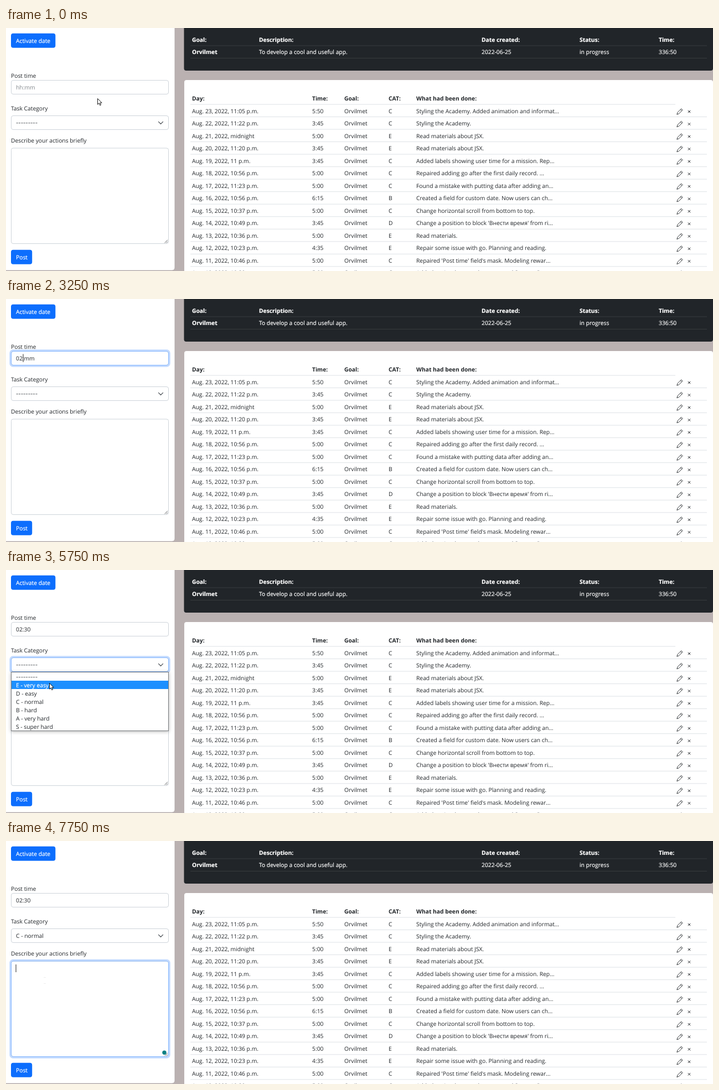
These frames come from a looping animation (1277x439 px, 8 s). An HTML page:

```html
<!DOCTYPE html>
<html lang="en">
<head>
<meta charset="utf-8">
<title>Time log</title>
<style>
  html, body { margin: 0; width: 100%; height: 100%; overflow: hidden; background: #bab1b1; }
  svg { display: block; width: 1277px; height: 439px; }
  text { font: 10.3px "Open Sans", "Noto Sans", sans-serif; fill: #212529; white-space: pre; text-rendering: geometricPrecision; }
  .bold { font-weight: 700; }
  .light { fill: #fff; stroke: #fff; stroke-width: .2; }
  .hint { fill: #82878c; }
  .dashes { font: 12px "DejaVu Sans", sans-serif; fill: #50555a; }
  .button { fill: #0d6efd; }
  .field { fill: #fff; stroke: #ced4da; }
  .rule { stroke: #dee2e6; }
  .dark-rule { stroke: #373b3e; }
  .focus { fill: none; stroke: #86b7fe; }
  .glow { fill: none; stroke: #0d6efd; stroke-opacity: .25; stroke-width: 2.7; }
  .icon { fill: none; stroke: #212529; }
  .caret { fill: #222; }
  .list { fill: #fff; stroke: #76797c; filter: drop-shadow(0 1px 3px rgba(0, 0, 0, .3)); }
  .pick { fill: #1e90ff; }
  [data-on] { visibility: hidden; }
</style>
</head>
<body>
<svg viewBox="0 0 1277 439">
  <defs>
    <path id="arrow" d="M.5 .5v10.6l2.5-2.3 1.8 4 1.7-.8-1.7-3.8h3.3z" fill="#fff" stroke="#000" stroke-width=".9"/>
    <path id="beam" d="M-2-5.5h4M-2 5.5h4" stroke="#000" stroke-opacity=".07"/>
    <g id="tools" class="icon">
      <path d="M1211.8 156.2l1.3-3.8 6.6-6.6 2.4 2.4-6.6 6.6zM1218.2 147.3l2.4 2.4" stroke-width=".9" stroke-linejoin="round"/>
      <path d="M1231.8 148.8l4.4 4.4m0-4.4l-4.4 4.4"/>
    </g>
  </defs>

  <path d="M-2-2H305V433a5 5 0 0 1-5 5H-2z" fill="#fff" stroke="#a9a1a1" stroke-width=".8"/>
  <rect x="321.5" y="-6" width="955.5" height="83" rx="4" fill="#212529"/>
  <rect x="322" y="94" width="955" height="360" rx="4" fill="#fff"/>
  <g id="tables"></g>

  <rect class="button" x="9" y="9.7" width="80.3" height="26" rx="4"/>
  <text class="light" x="18" y="26.6">Activate date</text>
  <text x="9" y="90">Post time</text>
  <text x="9" y="149">Task Category</text>
  <text x="9" y="207.3">Describe your actions briefly</text>
  <rect class="button" x="9" y="400.8" width="38.2" height="26" rx="4"/>
  <text class="light" x="18" y="417.7">Post</text>

  <rect class="field" x="9.5" y="94.5" width="284" height="25" rx="3.5"/>
  <rect class="field" x="9.5" y="158.5" width="284" height="25" rx="3.5"/>
  <rect class="field" x="9.5" y="217" width="284" height="172.5" rx="3.5"/>
  <path d="M275.5 169.3l4 4 4-4" fill="none" stroke="#41474d" stroke-width="1.2" stroke-linecap="round"/>
  <path d="M286.5 388.3l5.5-5.5m-2.5 5.5l2.5-2.5" class="icon" stroke-width=".7"/>
  <g id="rings"></g>

  <text class="hint" x="18" y="111" data-on="0-750">hh:mm</text>
  <text x="18" y="111" data-on="750-3000">hh:mm</text>
  <text x="18" y="111" data-on="3000-3250">0h:mm</text>
  <text x="18" y="111" data-on="3250-4000">02:mm</text>
  <text x="18" y="111" data-on="4000-4250">02:3m</text>
  <text x="18" y="111" data-on="4250-8000">02:30</text>
  <text class="dashes" x="18" y="174.8" data-on="0-7250">---------</text>
  <text x="18" y="175" data-on="7250-8000">C - normal</text>

  <g class="caret">
    <rect x="51" y="99.5" width="1" height="14.5" data-on="750-1250 1750-2250 2750-3000"/>
    <rect x="24" y="99.5" width="1" height="14.5" data-on="3000-3250"/>
    <rect x="30.5" y="99.5" width="1" height="14.5" data-on="3250-3750"/>
    <rect x="39" y="99.5" width="1" height="14.5" data-on="4000-4250"/>
    <rect x="44.5" y="99.5" width="1" height="14.5" data-on="4250-4750"/>
    <rect x="17.5" y="223" width="1" height="14" data-on="7750-8000"/>
  </g>
  <circle cx="286" cy="382.3" r="3.7" fill="#0b8083" data-on="7750-8000"/>

  <g id="menu" data-on="5250-7000"></g>
  <g id="pointer"></g>
</svg>
<script>
  const LOOP = 8000;
  const GOAL = 'Orvilmet';
  const byId = id => document.getElementById(id);
  const label = (x, y, str, cls = '') => `<text class="${cls}" x="${x}" y="${y}">${str}</text>`;
  const line = (y, end, cls = 'rule') => `<path class="${cls}" d="M333 ${y}H${end}"/>`;
  const cells = (xs, y, strs, cls) => strs.map((s, i) => label(xs[i], y, s, cls)).join('');

  // Goal summary and log table
  const goalX = [336, 457, 859, 1036, 1179];
  const logX = [336, 553, 611, 691, 741];
  const log = [
    ['23, 2022, 11:05 p.m.', '5:50', 'C', 'Styling the Academy. Added animation and informat...'],
    ['22, 2022, 11:22 p.m.', '3:45', 'C', 'Styling the Academy.'],
    ['21, 2022, midnight', '5:00', 'E', 'Read materials about JSX.'],
    ['20, 2022, 11:20 p.m.', '3:45', 'E', 'Read materials about JSX.'],
    ['19, 2022, 11 p.m.', '3:45', 'C', 'Added labels showing user time for a mission. Rep...'],
    ['18, 2022, 10:56 p.m.', '5:00', 'C', 'Repaired adding go after the first daily record. ...'],
    ['17, 2022, 11:23 p.m.', '5:00', 'C', 'Found a mistake with putting data after adding an...'],
    ['16, 2022, 10:56 p.m.', '6:15', 'B', 'Created a field for custom date. Now users can ch...'],
    ['15, 2022, 10:37 p.m.', '5:00', 'C', 'Change horizontal scroll from bottom to top.'],
    ['14, 2022, 10:49 p.m.', '3:45', 'D', "Change a position to block 'Внести время' from ri..."],
    ['13, 2022, 10:36 p.m.', '5:00', 'E', 'Read materials.'],
    ['12, 2022, 10:23 p.m.', '4:35', 'E', 'Repair some issue with go. Planning and reading.'],
    ['11, 2022, 10:46 p.m.', '5:00', 'C', "Repaired 'Post time' field's mask. Modeling rewar..."],
    ['10, 2022, 10:30 p.m.', '5:00', 'C', 'Added an Academy to the menu and System. R...']
  ];
  byId('tables').innerHTML =
    cells(goalX, 24.5, ['Goal:', 'Description:', 'Date created:', 'Status:', 'Time:'], 'bold light') +
    label(336, 47, GOAL, 'bold light') +
    cells(goalX.slice(1), 47, ['To develop a cool and useful app.', '2022-06-25', 'in progress', '336:50'], 'light') +
    line(32, 1266, 'dark-rule') + line(54.5, 1266, 'dark-rule') +
    cells(logX, 131, ['Day:', 'Time:', 'Goal:', 'CAT:', 'What had been done:'], 'bold') +
    line(138, 1209) +
    log.map(([day, time, cat, done], i) => {
      const dy = 22.53 * i;
      return cells(logX, 153.5 + dy, ['Aug. ' + day, time, GOAL, cat, done]) +
        line(160.5 + dy, 1266) + `<use href="#tools" y="${dy}"/>`;
    }).join('');

  // Focus rings, at half strength while they fade
  const ring = (y, h, full, half) => [[full, 1], [half, .5]].map(([on, alpha]) =>
    `<g data-on="${on}" opacity="${alpha}">
      <rect class="glow" x="7.65" y="${y - 1.85}" width="287.7" height="${h + 3.7}" rx="5"/>
      <rect class="focus" x="9.5" y="${y}" width="284" height="${h}" rx="3.5"/></g>`).join('');
  byId('rings').innerHTML =
    ring(94.5, 25, '750-5250', '5250-5500') +
    ring(158.5, 25, '5500-7500', '5250-5500 7500-7750') +
    ring(217, 172.5, '7750-8000', '7500-7750');

  // Open category list
  const options = ['---------', 'E - very easy', 'D - easy', 'C - normal', 'B - hard', 'A - very hard', 'S - super hard'];
  const picked = ['5250-5750', '5750-6000', '6000-6250', '6250-7000'];
  const option = (str, i, cls) => label(18, 196.5 + 15 * i, str, (i ? '' : 'dashes ') + cls);
  byId('menu').innerHTML =
    '<rect class="list" x="9.5" y="184.5" width="284" height="106"/>' +
    options.map((s, i) => option(s, i, '')).join('') +
    picked.map((on, i) => `<g data-on="${on}">
      <rect class="pick" x="10" y="${185 + 15 * i}" width="283" height="15"/>${option(options[i], i, 'light')}</g>`).join('');

  // Pointer stops: shape, x, y, time shown
  const stops = [
    ['arrow', 165, 127, '0-250'], ['arrow', 149, 117, '250-750'],
    ['beam', 62, 111, '750-1000'], ['beam', 48, 111, '1000-1250'],
    ['beam', 38, 119, '1250-1500'], ['beam', 32, 114, '1500-3000'],
    ['arrow', 66, 164, '4750-5000'], ['arrow', 74, 175, '5000-5750'],
    ['arrow', 78, 204, '5750-6000'], ['arrow', 75, 226, '6000-6250'],
    ['arrow', 73, 237, '6250-7250'], ['beam', 70, 252, '7250-8000']
  ];
  byId('pointer').innerHTML = stops.map(([shape, x, y, on]) =>
    `<use href="#${shape}" x="${x}" y="${y}" data-on="${on}"/>`).join('');

  // Each timed part is visible only within its ranges
  const parts = [...document.querySelectorAll('[data-on]')].map(el => ({
    el, spans: el.dataset.on.split(' ').map(s => s.split('-').map(Number))
  }));
  function draw() {
    const t = performance.now() % LOOP;
    for (const { el, spans } of parts) {
      el.style.visibility = spans.some(([from, to]) => t >= from && t < to) ? 'visible' : 'hidden';
    }
    requestAnimationFrame(draw);
  }
  draw();
</script>
</body>
</html>
```
